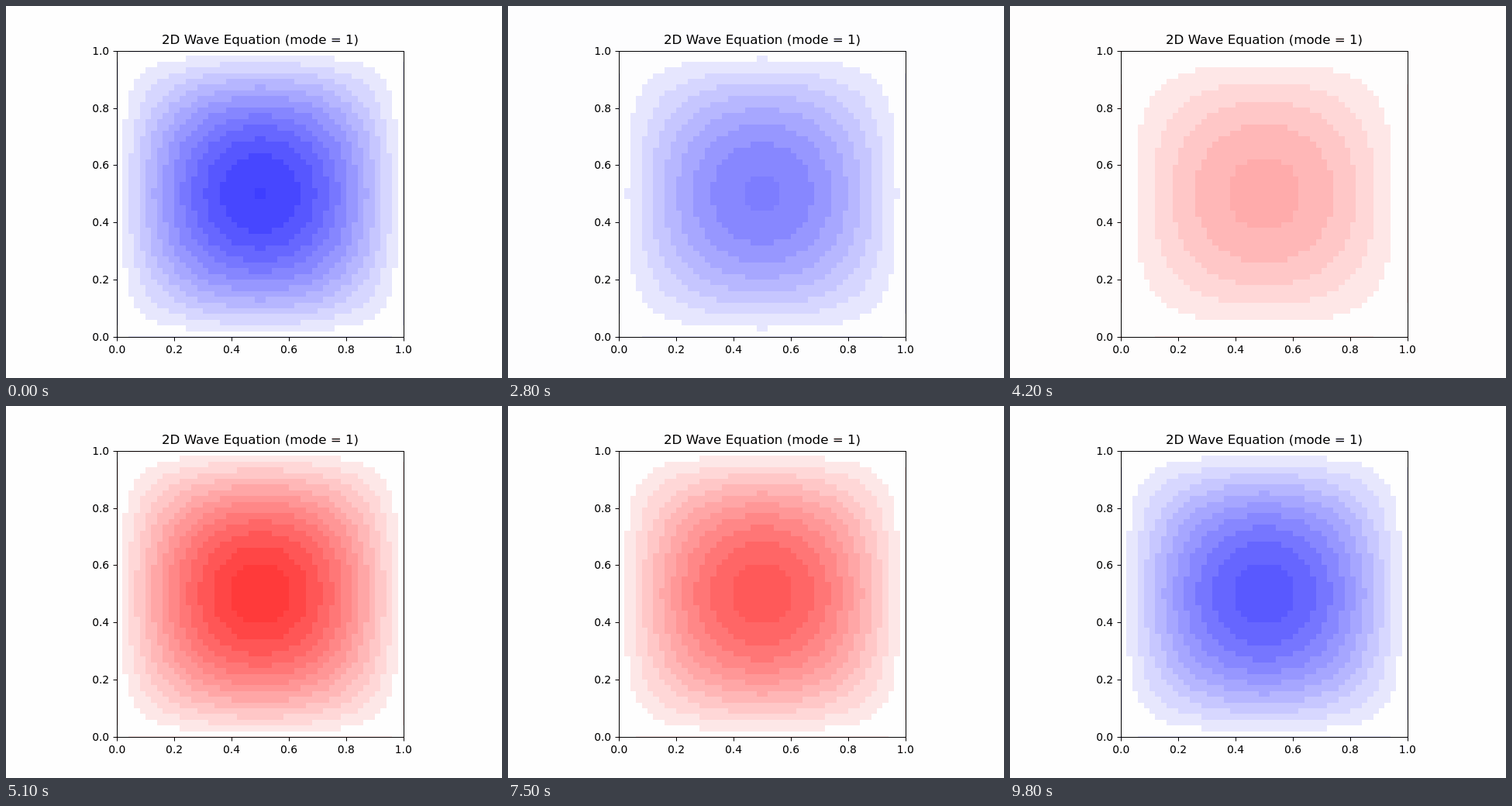
An HTML page with a canvas for the animation above (9.9 s loop, 640 by 480 pixels).

```html
<!DOCTYPE html>
<html lang="en">
<head>
<meta charset="utf-8">
<title>2D Wave Equation</title>
<style>
  html, body { margin: 0; width: 100%; height: 100%; overflow: hidden; background: #fff; }
  canvas { display: block; }
</style>
</head>
<body>
<canvas id="stage" width="640" height="480"></canvas>
<script>
const WIDTH = 640, HEIGHT = 480;
const FRAME_MS = 100, FRAMES = 99, PERIOD = 100, PEAK = 11.5;
const CELLS = 50, CELL = 7.4;
const LEFT = 143.2, BOTTOM = 427.2, SIDE = 369.6;
const FONT = '"DejaVu Sans", sans-serif';

const ctx = document.getElementById('stage').getContext('2d', { willReadFrequently: true });

// First eigenmode on the interior grid points, scaled to a maximum of 1
const mode = Array.from({ length: CELLS }, (_, i) =>
  Math.sin(Math.PI * (i + 1) / (CELLS + 1)) / Math.sin(Math.PI * (CELLS / 2) / (CELLS + 1)));

// Blue - white - red map for values from -1 to 1
function colour(value) {
  const level = Math.max(0, Math.min(255, Math.floor((value + 1) * 128)));
  const pale = 2 * Math.min(level, 255 - level);
  return level < 128 ? `rgb(${pale},${pale},255)` : `rgb(255,${pale},${pale})`;
}

function drawField(amplitude) {
  const edge = (start, i) => Math.round(start + i * CELL);
  for (let row = 0; row < CELLS; row++) {
    const top = Math.max(58, edge(57, row)), bottom = edge(57, row + 1);
    for (let col = 0; col < CELLS; col++) {
      const x = edge(143, col);
      ctx.fillStyle = colour(amplitude * mode[row] * mode[col]);
      ctx.fillRect(x, top, edge(143, col + 1) - x, bottom - top);
    }
  }
}

function drawText(text, x, y, size, align) {
  ctx.font = `${size}px ${FONT}`;
  ctx.textAlign = align;
  ctx.fillText(text, x, y);
}

function drawLine(x1, y1, x2, y2) {
  ctx.beginPath();
  ctx.moveTo(x1, y1);
  ctx.lineTo(x2, y2);
  ctx.stroke();
}

function drawAxes() {
  ctx.fillStyle = ctx.strokeStyle = '#000';
  ctx.lineWidth = 10 / 9;
  ctx.strokeRect(143.5, 58.5, 370, 369);
  for (let i = 0; i <= 5; i++) {
    const label = (i / 5).toFixed(1);
    const x = LEFT + SIDE * i / 5, y = BOTTOM - SIDE * i / 5;
    const tickX = Math.round(x) + 0.5, tickY = Math.round(y) + 0.5;
    drawLine(tickX, 427.5, tickX, 432.5);
    drawLine(138.5, tickY, 143.5, tickY);
    drawText(label, x, 448, 13.889, 'center');
    drawText(label, 133.2, Math.round(y + 5), 13.889, 'right');
  }
  drawText('2D Wave Equation (mode = 1)', 328, 49, 16.667, 'center');
}

// Replace every pixel by the mean of its colour bucket (3, 4 and 3 bits)
function quantise() {
  const image = ctx.getImageData(0, 0, WIDTH, HEIGHT), data = image.data;
  const count = new Uint32Array(1024), sums = new Float64Array(3 * 1024);
  const bucket = p => data[p] >> 5 << 7 | data[p + 1] >> 4 << 3 | data[p + 2] >> 5;
  for (let p = 0; p < data.length; p += 4) {
    const b = bucket(p);
    count[b]++;
    for (let c = 0; c < 3; c++) sums[3 * b + c] += data[p + c];
  }
  const means = sums.map((sum, i) => Math.floor(sum / (count[Math.floor(i / 3)] || 1)));
  for (let p = 0; p < data.length; p += 4) {
    const b = bucket(p);
    for (let c = 0; c < 3; c++) data[p + c] = means[3 * b + c];
  }
  ctx.putImageData(image, 0, 0);
}

let shown = -1;
function render(time) {
  const frame = Math.floor(time / FRAME_MS) % FRAMES;
  if (frame !== shown) {
    shown = frame;
    ctx.fillStyle = '#fff';
    ctx.fillRect(0, 0, WIDTH, HEIGHT);
    drawField(-Math.cos(2 * Math.PI * (frame - PEAK) / PERIOD));
    drawAxes();
    quantise();
  }
  requestAnimationFrame(() => render(performance.now()));
}
render(0);
</script>
</body>
</html>
```
